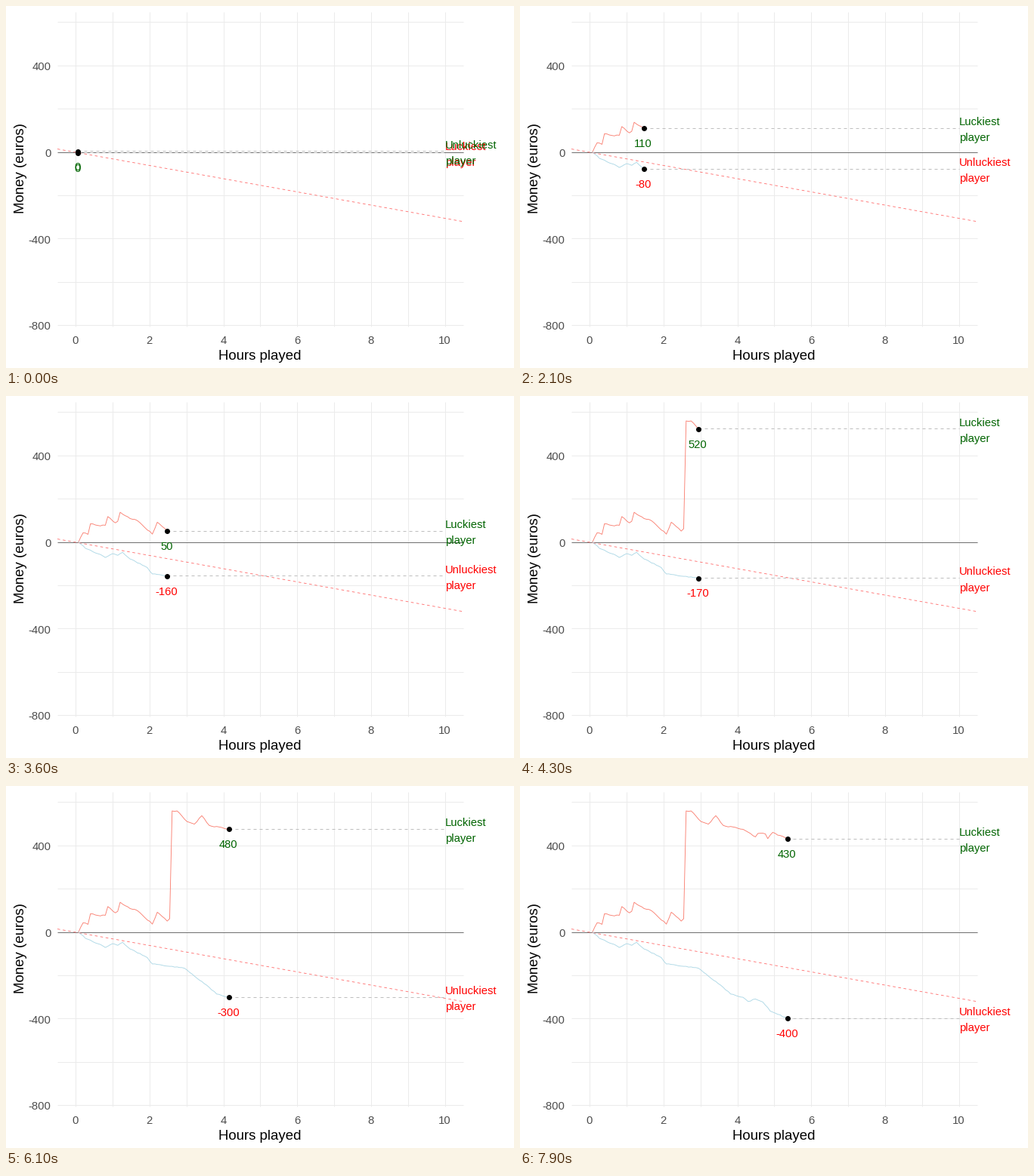
A matplotlib script for the animation above (8000 ms loop, 672 px wide and 480 px high).

```python
import matplotlib.pyplot as plt
import numpy as np
from matplotlib.animation import FuncAnimation

W, H, DPI = 672, 480, 96
FRAMES, INTERVAL = 80, 100
PX = 72 / DPI
plt.rcParams["font.family"] = ["Liberation Sans"]

LEFT, RIGHT, TOP, BOTTOM = 68, 605, 7.5, 425
GREEN, RED = "#006400", "#ff0000"
DASH = (0, (4, 4))


def px(h):
    return 92.2 + 48.85 * h


def py(v):
    return 193.55 - 0.287 * v


def walk(keys, seed, spread=2.5):
    """Balance per step: straight runs between wins and losses, plus jitter."""
    steps = np.arange(FRAMES)
    noise = np.random.default_rng(seed).uniform(-spread, spread, FRAMES)
    noise[list(keys)] = 0
    return np.interp(steps, list(keys), list(keys.values())) + noise


hours = 0.055 + 0.067 * np.arange(FRAMES)
lucky = walk({0: -3, 2: 44, 4: 37, 5: 86, 8: 78, 11: 79, 12: 119, 15: 90,
              16: 97, 17: 139, 21: 110, 24: 100, 30: 38, 32: 93, 36: 52,
              37: 63, 38: 561, 40: 561, 44: 512, 47: 500, 50: 539, 53: 494,
              61: 476, 66: 441, 67: 457, 70: 455, 71: 433, 73: 462,
              79: 431}, seed=1)
unlucky = walk({0: 4, 3: -28, 9: -56, 11: -70, 14: -52, 16: -60, 18: -46,
                21: -77, 28: -117, 30: -146, 36: -156, 43: -166, 50: -227,
                56: -285, 61: -300, 63: -319, 66: -308, 69: -322, 72: -364,
                79: -398}, seed=2)

fig = plt.figure(figsize=(W / DPI, H / DPI), dpi=DPI, facecolor="white")
ax = fig.add_axes([0, 0, 1, 1])
ax.set(xlim=(0, W), ylim=(H, 0))
ax.axis("off")


def line(x, y, color, z, width=1, **kw):
    return ax.plot(x, y, color=color, lw=width * PX, zorder=z,
                   solid_capstyle="butt", dash_capstyle="butt", **kw)[0]


def label(x, y, s, size, color, ha="center", va="baseline", **kw):
    return ax.text(x, y, s, fontsize=size * PX, color=color, ha=ha, va=va,
                   zorder=8, **kw)


for h in range(11):
    line([px(h)] * 2, [TOP, BOTTOM], "#ebebeb", 1)
    if h % 2 == 0:
        label(px(h) - 0.3, 447.5, str(h), 14.93, "#4d4d4d")
for v in range(-800, 601, 200):
    line([LEFT, RIGHT], [py(v)] * 2, "#ebebeb", 1)
    if v % 400 == 0:
        label(59.5, py(v) + 6.3, str(v), 14.93, "#4d4d4d", "right")
label(335.3, 469, "Hours played", 18.67, "black")
label(19.2, 215.3, "Money (euros)", 18.67, "black", va="center", rotation=90)

line([LEFT, RIGHT], [py(0)] * 2, "#707070", 2)
line([LEFT, RIGHT], [py(15.5) + 0.5, py(-320) + 0.5], "#ff7373", 2, 0.9,
     linestyle=DASH)


class Player:
    def __init__(self, name, values, color, z):
        self.values = values
        self.path = line([], [], color, z, 0.9)
        self.guide = line([], [], "#bebebe", z, linestyle=DASH)
        self.dot = ax.plot([], [], "o", color="black", ms=7 * PX, mew=0,
                           zorder=6)[0]
        self.amount = label(0, 0, "", 14.7, GREEN)
        self.name = [label(581, 0, s, 14.7, GREEN, "left")
                     for s in (name, "player")]

    def show(self, n):
        v = self.values[n]
        x, y = px(hours[n]), py(v)
        self.path.set_data(px(hours[:n + 1]) + 0.5,
                           py(self.values[:n + 1]) + 0.5)
        self.guide.set_data([x, px(10)], [y, y])
        self.dot.set_data([x + 0.3], [y + 0.5])
        shown = int(round(v / 10)) * 10
        self.amount.set(text=str(shown), position=(x - 0.5, y + 25.2),
                        color=GREEN if shown >= 0 else RED)
        for text, dy in zip(self.name, (-3.7, 17.5)):
            text.set(y=y + dy, color=GREEN if v > 0 else RED)


players = [Player("Luckiest", lucky, "salmon", 3),
           Player("Unluckiest", unlucky, "lightblue", 4)]


def draw(n):
    for p in players:
        p.show(n)
    return []


anim = FuncAnimation(fig, draw, frames=FRAMES, interval=INTERVAL,
                     init_func=lambda: draw(0), repeat=True, repeat_delay=0,
                     blit=False)
plt.show()
```
